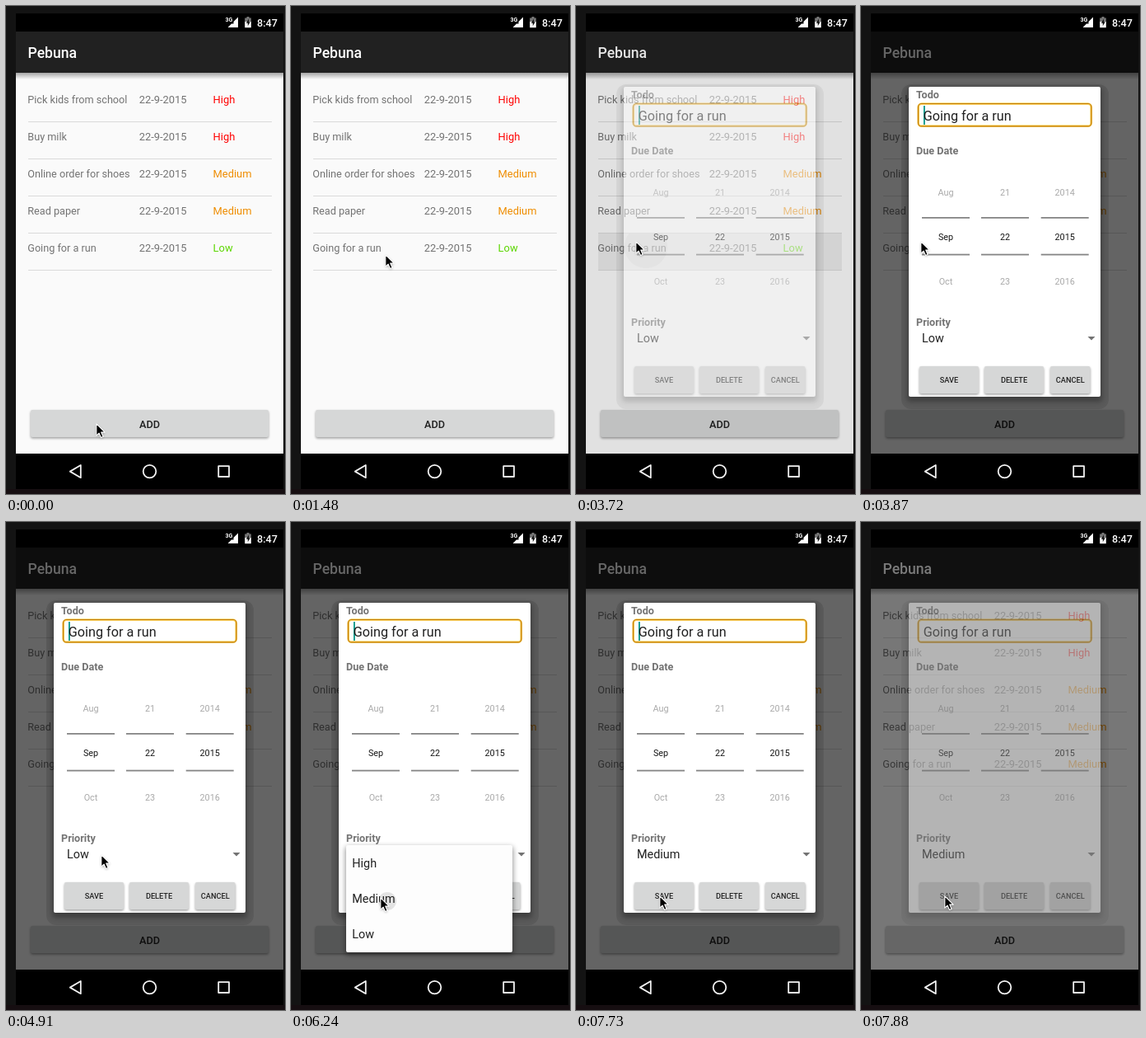
Animation, 339 px wide and 592 px high, one loop 8 s. Source, as an HTML page:

```html
<!DOCTYPE html>
<html lang="en">
<head>
<meta charset="utf-8">
<title>Todo list</title>
<style>
  html, body { margin: 0; width: 100%; height: 100%; overflow: hidden; background: #131313; }
  svg { display: block; width: 339px; height: 592px; font-family: Roboto, Arial, sans-serif; }
  .m { font-weight: 500; }
  .b { font-weight: 700; fill: #737373; font-size: 12.6px; }
  .mid { text-anchor: middle; }
  .item { font-size: 14.4px; fill: #212121; }
</style>
</head>
<body>
<svg viewBox="0 0 339 592">
  <defs>
    <filter id="soft" x="-20%" y="-20%" width="140%" height="140%"><feGaussianBlur stdDeviation="1.6"/></filter>
    <filter id="wide" x="-20%" y="-20%" width="140%" height="140%"><feGaussianBlur stdDeviation="3"/></filter>
    <linearGradient id="fall" x1="0" y1="0" x2="0" y2="1">
      <stop offset="0" stop-color="#000" stop-opacity=".34"/>
      <stop offset="1" stop-color="#000" stop-opacity="0"/>
    </linearGradient>
    <clipPath id="rowClip"><rect x="27" y="276" width="296" height="44"/></clipPath>
    <clipPath id="itemClip"><rect x="67" y="435.5" width="202" height="43"/></clipPath>
    <clipPath id="cardClip"><rect x="58" y="98" width="233" height="376"/></clipPath>
  </defs>

  <rect width="339" height="592" fill="#131313"/>
  <rect y="586" width="339" height="6" fill="#160e11"/>
  <rect x="12" y="9" width="325" height="577" fill="#000"/>
  <rect x="12" y="31" width="325" height="512" fill="#fafafa"/>
  <rect x="12" y="81" width="325" height="8" fill="url(#fall)"/>
  <rect x="12" y="31" width="325" height="50" fill="#212121"/>
  <text class="m" x="26.5" y="63" font-size="17.6" fill="#fff">Pebuna</text>

  <g id="press" clip-path="url(#rowClip)">
    <rect x="27" y="276" width="296" height="44" fill="#000" opacity=".06"/>
    <circle cx="85" cy="292" r="26" fill="#000" opacity=".06"/>
  </g>
  <g id="list"></g>
  <g id="add"></g>
  <rect id="dim" x="12" y="31" width="325" height="512" fill="#000"/>

  <g id="dialog">
    <rect x="49" y="95" width="252" height="394" rx="12" opacity=".1"/>
    <rect x="56" y="99" width="237" height="381" rx="4" opacity=".3" filter="url(#wide)"/>
    <rect x="58" y="98" width="233" height="376" rx="2" fill="#fff"/>
    <text class="b" x="67" y="112">Todo</text>
    <text class="b" x="67" y="180">Due Date</text>
    <text class="b" x="67" y="388">Priority</text>
    <rect x="69.7" y="118.7" width="210" height="27" rx="4" fill="#fff" stroke="#ffd768" stroke-width="2.8"/>
    <rect x="69.5" y="118.5" width="210.4" height="27.4" rx="4" fill="none" stroke="#c07c08" stroke-width="1.2"/>
    <rect id="caret" x="76" y="121" width="1.8" height="23" fill="#009688"/>
    <text x="75.8" y="138.6" font-size="16.2" fill="#212121">Going for a run</text>
    <g id="pickers"></g>
    <g clip-path="url(#cardClip)"><circle id="spot" cx="280" cy="403" r="16" fill="#000" opacity=".12"/></g>
    <text id="value" class="item" x="74" y="408.2"></text>
    <path d="M275.5 401h9l-4.5 4.6z" fill="#737373"/>
    <g id="actions"></g>
  </g>

  <g id="menu">
    <rect x="66" y="394" width="204" height="131" rx="3" opacity=".4" filter="url(#wide)"/>
    <rect x="67" y="392" width="202" height="130" rx="2" fill="#fdfdfd"/>
    <g clip-path="url(#itemClip)"><circle id="wave" cx="117" cy="460" fill="#000" opacity=".1"/></g>
    <g id="items"></g>
  </g>

  <g fill="#fff">
    <text class="m" x="305" y="24.7" font-size="12.6">8:47</text>
    <text class="b" x="266.5" y="19" style="font-size:7px;fill:#fff">3G</text>
    <path d="M282 13.5V26h-12.5l4.5-4.5h2.5V19z"/>
    <path d="M292.5 13h3v1.4h2.3v4.6h-7.6v-4.6h2.3z" fill="#777"/>
    <path d="M290.2 19h7.6v7.2h-7.6z"/>
    <path d="M295 15.5l-3.2 5.2h2v3.6l3-5h-1.8z" fill="#111"/>
  </g>
  <g fill="none" stroke="#f2f2f2" stroke-width="1.8" stroke-linejoin="round">
    <path d="M77.8 564.6l13-7.6v15.2z"/>
    <circle cx="174.5" cy="564.6" r="7.8"/>
    <rect x="258.2" y="558.2" width="12.8" height="12.8"/>
  </g>

  <g id="cursor">
    <path d="M1 2v14.5l3.3-3.1 2.3 5.3 2.6-1.1-2.3-5.2h4.6z" opacity=".35" filter="url(#soft)"/>
    <path d="M.8.8v14.4l3.3-3.1 2.4 5.4 2.6-1.1-2.4-5.3h4.5z" fill="#000" stroke="#fff" stroke-width="1.1" stroke-linejoin="round"/>
  </g>
</svg>
<script>
const $ = id => document.getElementById(id);

const text = (s, x, y, size, fill, cls = '') =>
  `<text x="${x}" y="${y}" font-size="${size}" fill="${fill}" class="${cls}">${s}</text>`;

const button = (s, x, y, w, size, base) =>
  `<rect x="${x}" y="${y + 1.5}" width="${w}" height="33" rx="2" opacity=".38" filter="url(#soft)"/>
   <rect x="${x}" y="${y}" width="${w}" height="33" rx="2" fill="#d6d7d7"/>` +
  text(s, x + w / 2, base, size, '#212121', 'm mid');

const colors = { High: '#ff0000', Medium: '#ef8d00', Low: '#5cd600' };
const todos = [
  ['Pick kids from school', 'High'],
  ['Buy milk', 'High'],
  ['Online order for shoes', 'Medium'],
  ['Read paper', 'Medium'],
  ['Going for a run', 'Low']
];

$('list').innerHTML = todos.map(([name, level], i) => {
  const y = 118.2 + 45 * i;
  return text(name, 26.3, y, 12.65, '#737373') +
    text('22-9-2015', 161.7, y, 12.9, '#737373') +
    text(level, 251.6, y, 12.9, colors[level]) +
    `<rect x="27" y="${140 + 45 * i}" width="296" height="1" fill="#dadada"/>`;
}).join('');
const lastLevel = $('list').querySelectorAll('text')[14];

$('add').innerHTML = button('ADD', 30, 490, 289, 12.7, 511.5);
$('actions').innerHTML = [['SAVE', 71, 72], ['DELETE', 150, 72], ['CANCEL', 230, 48.5]]
  .map(([s, x, w]) => button(s, x, 437, w, 9.2, 456.8)).join('');

$('pickers').innerHTML = [
  [103, 'Aug', 'Sep', 'Oct'],
  [175, 21, 22, 23],
  [247.7, 2014, 2015, 2016]
].map(([x, ...rows]) =>
  rows.map((s, i) => text(s, x, 229.5 + 54 * i, 10.8, i === 1 ? '#161616' : '#a9a9a9', 'mid')).join('') +
  [256, 300.7].map(y => `<rect x="${x - 29}" y="${y}" width="58" height="1.8" fill="#858585"/>`).join('')
).join('');

$('items').innerHTML = ['High', 'Medium', 'Low']
  .map((s, i) => `<text class="item" x="74.3" y="${419.2 + 43 * i}">${s}</text>`).join('');

// Each step changes part of the state from its time on.
const at = (x, y, more) => ({ x, y, ...more });
const steps = [
  [0, at(109, 506, { press: 0, dim: 0, dialog: 0, caret: 1, spot: 0, value: 'Low', menu: 0, wave: 0, level: 'Low' })],
  [450, at(109, 488)], [600, at(111, 442)], [740, at(112, 398)], [890, at(113, 368)],
  [1190, at(114, 345)], [1340, at(114, 314)], [1480, at(114, 301)],
  [2980, at(101, 304)], [3130, at(69, 290)], [3280, at(72, 285)],
  [3720, { press: 1, dim: .1, dialog: .5 }],
  [3870, { press: 0, dim: .6, dialog: 1 }],
  [4310, at(78, 302, { caret: 0 })], [4460, at(101, 370)], [4610, at(122, 421)],
  [4760, at(119, 411, { caret: 1 })], [4910, at(115, 403)],
  [5200, { spot: .06 }], [5350, { spot: .12, menu: .5 }], [5500, { spot: .06, menu: 1 }], [5650, { spot: 0 }],
  [5800, at(114, 413)], [5940, at(112, 432)], [6090, at(109, 449)],
  [6240, at(108, 455, { wave: 11 })],
  [6390, { wave: 60 }], [6540, { wave: 160 }],
  [6690, { menu: .45, value: 'Medium' }], [6840, { menu: 0, wave: 0 }],
  [6990, at(107, 456)], [7130, at(105, 458, { caret: 0 })], [7280, at(103, 455)], [7430, at(101, 453)],
  [7580, { caret: 1 }],
  [7880, { dim: .52, dialog: .45, caret: 0, level: 'Medium' }]
];

const fade = (id, v) => {
  $(id).setAttribute('opacity', v);
  $(id).style.display = v ? '' : 'none';
};

function draw() {
  const t = performance.now() % 8000;
  const s = Object.assign({}, ...steps.filter(([from]) => from <= t).map(p => p[1]));
  ['press', 'dim', 'dialog', 'caret', 'spot', 'menu'].forEach(id => fade(id, s[id]));
  $('wave').setAttribute('r', s.wave);
  $('value').textContent = s.value;
  lastLevel.textContent = s.level;
  lastLevel.setAttribute('fill', colors[s.level]);
  $('cursor').setAttribute('transform', `translate(${s.x} ${s.y})`);
  requestAnimationFrame(draw);
}
draw();
</script>
</body>
</html>
```
